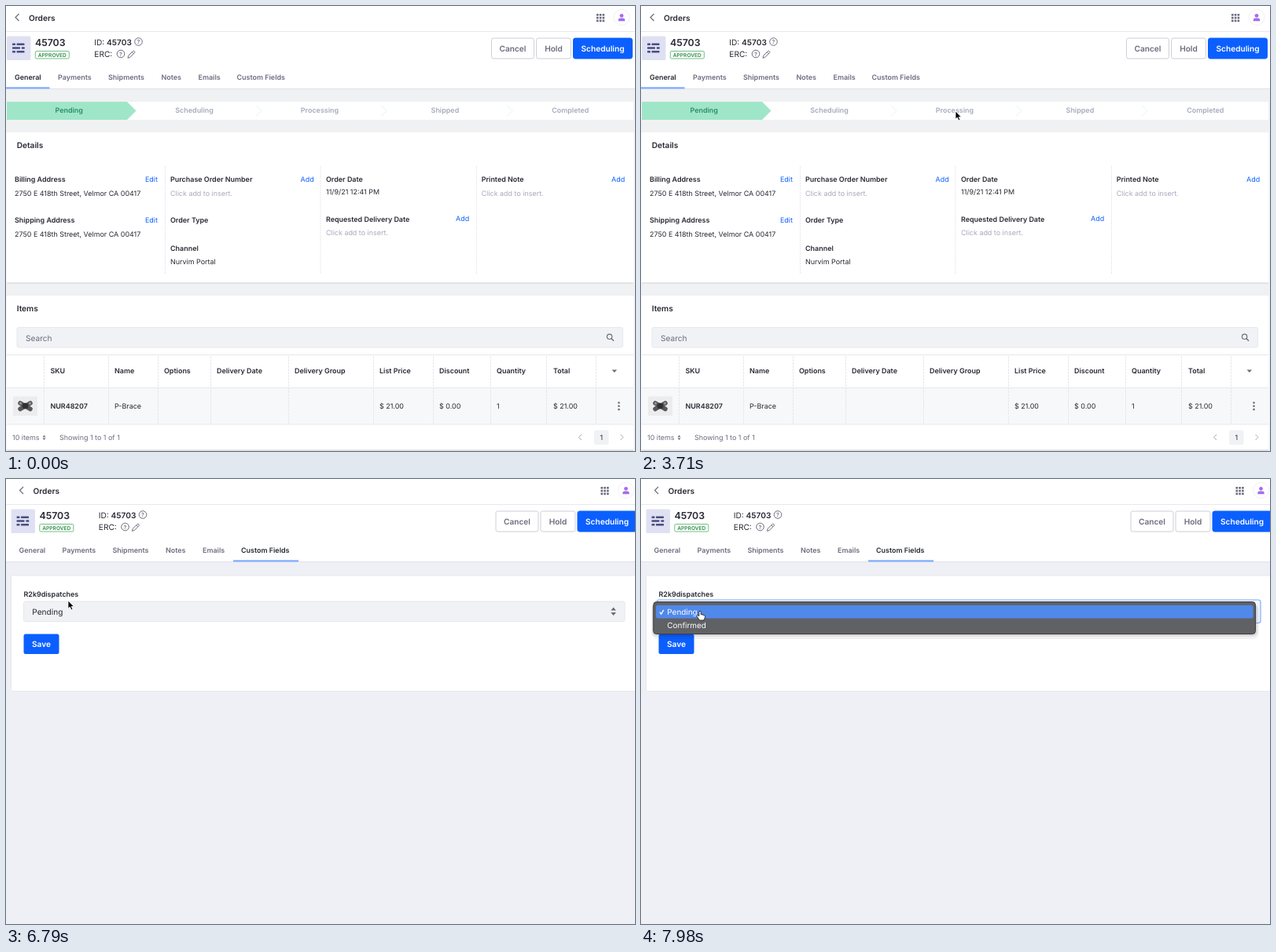
These frames come from a looping animation (800x567 px, 8 s). An HTML page:

```html
<!DOCTYPE html>
<html lang="en">
<head>
<meta charset="utf-8">
<title>Order workflow</title>
<style>
  html, body { margin: 0; width: 100%; height: 100%; overflow: hidden; background: #f0f1f4; }
  svg { display: block; font-family: Inter, "Open Sans", sans-serif; text-rendering: geometricPrecision; }
</style>
</head>
<body>
<svg id="stage" width="800" height="567" viewBox="0 0 800 567"></svg>
<script>
const INK = '#272833', GREY = '#6b6c7e', PALE = '#a7a9bc', LINE = '#e7e7ed', BLUE = '#0b5fff', FOCUS = '#80acff';
const SMALL = 8.95, LARGE = 10.15;

// y is the middle of the capitals
const text = (x, y, label, { size = SMALL, weight = 400, fill = INK, anchor = 'start', attrs = '' } = {}) =>
  `<text x="${x}" y="${y + size * 0.36}" font-size="${size}" font-weight="${weight}" fill="${fill}" text-anchor="${anchor}" ${attrs}>${label}</text>`;
const bold = (x, y, label, options) => text(x, y, label, { weight: 600, ...options });
const rect = (x, y, w, h, fill, attrs = '') =>
  `<rect x="${x}" y="${y}" width="${w}" height="${h}" fill="${fill}" ${attrs}/>`;
const path = (d, stroke, width = 1, attrs = 'fill="none"') =>
  `<path d="${d}" stroke="${stroke}" stroke-width="${width}" ${attrs}/>`;
const shape = (d, fill) => `<path d="${d}" fill="${fill}"/>`;
const circle = (x, y, r, fill, attrs = '') => `<circle cx="${x}" cy="${y}" r="${r}" fill="${fill}" ${attrs}/>`;
const each = (list, draw) => list.map(draw).join('');

const button = (x, w, label, primary) =>
  rect(x, 41, w, 26, primary ? BLUE : '#fff', `rx="2.5" stroke="${primary ? BLUE : '#cdced9'}"`) +
  bold(x + w / 2, 54.3, label, { size: LARGE, fill: primary ? '#fff' : GREY, anchor: 'middle' });

const help = (x, y) => circle(x, y, 4.8, 'none', `stroke="${GREY}"`) +
  bold(x, y + .2, '?', { size: 7, fill: GREY, anchor: 'middle' });

const tabs = [[11, 'General'], [66, 'Payments'], [130, 'Shipments'], [197.5, 'Notes'], [244.5, 'Emails'], [293.5, 'Custom Fields']];

const header = `
  ${rect(0, 0, 800, 105, '#fff')}
  ${path('M0 32.5H800', LINE)}${path('M0 105.5H800', '#e2e3e9')}
  <g id="header">
    ${path('M16.5 10L12 14.5L16.5 19', GREY, 1.2)}
    ${bold(29, 15.3, 'Orders', { size: LARGE })}
    ${each([0, 1, 2, 3, 4, 5, 6, 7, 8], i => rect(751 + i % 3 * 3.8, 10 + (i / 3 | 0) * 3.8, 2.6, 2.6, GREY))}
    ${circle(783, 14.5, 10, '#fff', 'stroke="#f1f0f6"')}
    ${circle(783, 12.3, 2.4, '#a46bf0')}
    ${shape('M778.8 19.3V18q0-2.5 2.5-2.5h3.4q2.5 0 2.5 2.5v1.3z', '#a46bf0')}
    ${rect(1, 38.5, 30.5, 30.5, '#dfe1f3', 'rx="1.5"')}
    ${each([[8, 47.5, 4], [13.5, 47.5, 10], [8, 52.3, 10], [19.8, 52.3, 4], [8, 57.1, 4], [13.5, 57.1, 10]],
      ([x, y, w]) => rect(x, y, w, 2.4, '#4a4d80', 'rx=".6"'))}
    ${bold(37, 46.2, '45703', { size: 12.3 })}
    ${rect(37.3, 57.5, 43, 9.5, '#fff', 'rx="1.5" stroke="#6fc086"')}
    ${bold(58.8, 62.4, 'APPROVED', { size: 6.6, fill: '#2f8a45', anchor: 'middle' })}
    ${text(112.3, 46.5, 'ID: <tspan font-weight="600">45703</tspan>', { size: LARGE })}
    ${text(112.3, 61.8, 'ERC:', { size: LARGE })}
    ${help(168.5, 45.5)}${help(146, 61)}
    ${path('M155 66.3L155.7 63.3L161.6 57.4Q162.7 56.8 163.6 58Q164.2 58.9 163.6 59.5L157.8 65.4ZM160.3 58.7L162.4 60.8', GREY)}
    ${button(617.5, 54, 'Cancel')}${button(674.5, 44, 'Hold')}${button(721.5, 75, 'Scheduling', true)}
    ${each(tabs, ([x, label]) => bold(x, 90.3, label, { fill: GREY, attrs: 'class="tab"' }))}
    <rect id="underline" y="103.3" height="2.2" fill="${FOCUS}"/>
    ${rect(281, 78.5, 87, 24, 'none', `id="tabFocus" stroke="${FOCUS}" stroke-width="1.5"`)}
  </g>`;

const card = (y, h) =>
  rect(1, y + 1, 797, h, '#cfd0d6', 'rx="1.5"') + rect(.5, y, 798, h, '#fff', 'rx="1.5"');

const address = '2750 E 418th Street, Velmor CA 00417';
const hint = 'Click add to insert.';
const link = (x, y, label) => text(x, y, label, { fill: BLUE });

const details = card(161, 191.5) +
  bold(13.7, 177.5, 'Details', { size: LARGE }) +
  each([202.5, 400, 598.5], x => path(`M${x} 204V342`, LINE, 1, 'stroke-dasharray="2 1"')) +
  each([[11, 221, 'Billing Address'], [11, 273, 'Shipping Address'], [209, 221, 'Purchase Order Number'],
    [209, 272.3, 'Order Type'], [209, 308.5, 'Channel'], [407, 220.3, 'Order Date'],
    [407, 271.3, 'Requested Delivery Date'], [604.7, 221, 'Printed Note']], args => bold(...args)) +
  each([[11, 239, address], [11, 291, address], [209, 326, 'Nurvim Portal'], [407, 237, '11/9/21 12:41 PM']], args => text(...args)) +
  each([[209, 239], [407, 289], [604.7, 239]], ([x, y]) => text(x, y, hint, { fill: PALE })) +
  each([[177, 221, 'Edit'], [177, 273, 'Edit'], [374.5, 221, 'Add'], [572, 271, 'Add'], [770, 221, 'Add']], args => link(...args));

const columns = [[56.5, 'SKU'], [138, 'Name'], [201, 'Options'], [268, 'Delivery Date'], [367, 'Delivery Group'],
  [475, 'List Price'], [551, 'Discount'], [624, 'Quantity'], [696, 'Total']];
const cells = [[138, 'P-Brace'], [475, '$ 21.00'], [551, '$ 0.00'], [624, '1'], [696, '$ 21.00']];
const muted = { fill: GREY };

const items = card(369, 196.5) +
  bold(13.7, 385.5, 'Items', { size: LARGE }) +
  rect(14, 409.5, 770.5, 25.5, '#f1f2f5', `rx="2" stroke="${LINE}"`) +
  text(25, 423, 'Search', { size: LARGE, fill: GREY }) +
  circle(767.6, 421.3, 3.2, 'none', `stroke="${GREY}" stroke-width="1.2"`) + path('M770 423.8L773 426.8', GREY, 1.4) +
  rect(1, 487, 797, 46, '#f7f8f9') +
  each([444.5, 486.5, 533], y => path(`M1 ${y}H798`, LINE)) +
  each([48.5, 130.5, 193.5, 260.5, 359.5, 467.5, 543.5, 616.5, 687.5, 750.5], x => path(`M${x} 446V532`, LINE, 1, 'stroke-dasharray="3 1"')) +
  each(columns, ([x, label]) => bold(x, 465, label)) +
  shape('M770.5 463.5h6.6l-3.3 3.6z', GREY) +
  rect(9, 497.5, 31, 24.5, '#ececee') +
  path('M18 506L31 513.5M31 506L18 513.5', '#56565b', 5.5, 'stroke-linecap="round"') +
  circle(24.5, 509.5, 3.8, '#303034') + circle(18.5, 506.2, 1.5, '#9b9ba0') + circle(30.5, 506.2, 1.5, '#9b9ba0') +
  bold(56.5, 509.7, 'NUR48207') +
  each(cells, ([x, label]) => text(x, 509.7, label)) +
  each([505.5, 509.8, 514.1], y => circle(779.5, y, 1.3, GREY)) +
  text(8, 549.5, '10 items', muted) + text(68, 549.5, 'Showing 1 to 1 of 1', muted) +
  shape('M46.5 549.2h4l-2-2.4zM46.5 550.6h4l-2 2.4z', GREY) +
  rect(748, 540.5, 18.5, 18.5, '#f1f2f5', 'rx="2"') +
  text(757.2, 549.7, '1', { anchor: 'middle' }) +
  path('M732 546L728.5 549.5L732 553M781.5 546L785 549.5L781.5 553', PALE);

const stepNames = ['Pending', 'Scheduling', 'Processing', 'Shipped', 'Completed'];
const steps = rect(.5, 122, 797.5, 23, '#fff', 'rx="1.5"') +
  shape('M1 122H154L165.5 133.5L154 145H1z', '#9fe6c8') +
  each([324, 483, 643], x => path(`M${x - 6} 126.5L${x + 1} 133.5L${x - 6} 140.5`, '#eeeff3')) +
  each(stepNames, (label, i) => bold(80.2 + i * 159.4, 133.2, label, { fill: i ? PALE : '#2b8b66', anchor: 'middle' }));

const white = { size: 9.95, fill: '#fff' };
const customFields = `
  ${rect(0, 106, 800, 461, '#eff0f5')}
  ${rect(6.5, 123, 800, 147.5, '#fff', 'rx="2" stroke="#e6e7ec"')}
  ${bold(22.5, 146.7, 'R2k9dispatches')}
  ${rect(22.5, 156, 764.5, 25.5, '#f1f2f5', `rx="2" stroke="${LINE}"`)}
  ${text(33.3, 169.3, 'Pending', { size: LARGE })}
  ${shape('M769.2 167.6h6.8l-3.4-4zM769.2 170h6.8l-3.4 4z', GREY)}
  ${rect(22.5, 197.5, 45, 25.5, BLUE, 'rx="2.5"')}
  ${bold(45, 210.6, 'Save', { size: LARGE, fill: '#fff', anchor: 'middle' })}
  <g id="menu">
    ${rect(20, 154, 768, 29.5, '#f0f5ff', `rx="3" stroke="${FOCUS}" stroke-width="1.2"`)}
    ${rect(13, 160, 773, 44, '#000', 'rx="8" opacity=".05"')}
    ${rect(14, 158, 770, 42.5, '#000', 'rx="6" opacity=".1"')}
    ${rect(15.8, 156.5, 765.7, 41, '#606165', 'rx="4" stroke="#3b3c40"')}
    <rect id="choice" x="19" width="759.5" height="16.8" rx="2.5" fill="#5089ea"/>
    ${path('M23.8 169.6L25.6 172L28.8 166.8', '#fff', 1.3)}
    ${text(33.3, 169.3, 'Pending', white)}${text(33.3, 186.1, 'Confirmed', white)}
  </g>`;

const pointer = `
  <g id="pointer">
    <g id="arrow">${path('M0 0V10.2L2.3 8.1L4 11.8L5.8 11L4.2 7.4H7.3Z', '#fff', .8, 'fill="#000"')}</g>
    <g id="hand">${path('M-1.2 1q1.2-1.8 2.4 0v3.5l4 .9q1.5.4 1.3 2l-.6 2.6q-.3 2-2.2 2h-3.2q-1 0-1.8-1.2l-2.8-4q-.6-1.4.9-1.5l2 1.3z', '#222', .9, 'fill="#fff"')}</g>
  </g>`;

const $ = id => document.getElementById(id);
$('stage').innerHTML = `<g id="general">${rect(0, 106, 800, 461, '#f0f1f3')}${steps}${details}${items}</g>
  <g id="custom">${customFields}</g>${header}${pointer}`;
const tabLabels = document.querySelectorAll('.tab');

const LOOP = 8000, TICK = 70, FOCUSED = 4690, SWITCH = 5110, OPEN = 7210;
// time, x, y of the pointer tip
const route = [[980, 802, 110], [1330, 780, 90], [1470, 780, 90], [2240, 765, 45], [2310, 765, 45], [2800, 256, 139.5],
  [3010, 256, 139.5], [3710, 400, 134], [3990, 400, 134], [4620, 330, 98.5], [4900, 330, 98.5], [5460, 235, 147.5],
  [5740, 228, 149], [6510, 82, 153], [6650, 82, 153], [6790, 79, 155], [7000, 72, 166], [7210, 72, 167],
  [7490, 68.5, 180.5], [7700, 68.5, 181], [7980, 75, 168]];

function pointerAt(t) {
  const next = route.findIndex(key => key[0] > t);
  if (next === 0) return [-50, -50];
  if (next < 0) return route.at(-1).slice(1);
  const [t0, x0, y0] = route[next - 1], [t1, x1, y1] = route[next];
  const u = (t - t0) / (t1 - t0), k = u * u * (3 - 2 * u);
  return [x0 + (x1 - x0) * k, y0 + (y1 - y0) * k];
}

const show = (id, on) => $(id).setAttribute('display', on ? 'inline' : 'none');
const inside = (v, low, high) => v > low && v < high;

function render(now) {
  const t = Math.floor(now % LOOP / TICK) * TICK;
  const custom = t >= SWITCH;
  const [x, y] = pointerAt(t);
  const onTab = !custom && inside(x, 281, 368) && inside(y, 78, 103);
  const onButton = !custom && inside(x, 721, 797) && inside(y, 41, 67);
  const hand = onTab || onButton || custom && y > 157;

  show('general', !custom);
  show('custom', custom);
  show('menu', t >= OPEN);
  show('tabFocus', t >= FOCUSED && !custom);
  $('header').setAttribute('transform', `translate(${custom ? 5.5 : 0})`);
  $('underline').setAttribute('x', custom ? 283.5 : 0);
  $('underline').setAttribute('width', custom ? 83 : 55.5);
  tabLabels[0].setAttribute('fill', custom ? GREY : INK);
  tabLabels[5].setAttribute('fill', custom || onTab ? INK : GREY);
  $('choice').setAttribute('y', y > 177 ? 177.4 : 160.7);
  show('arrow', !hand);
  show('hand', hand);
  $('pointer').setAttribute('transform', `translate(${x} ${y})`);
}

const start = performance.now();
(function loop() {
  render(performance.now() - start);
  requestAnimationFrame(loop);
})();
</script>
</body>
</html>
```
